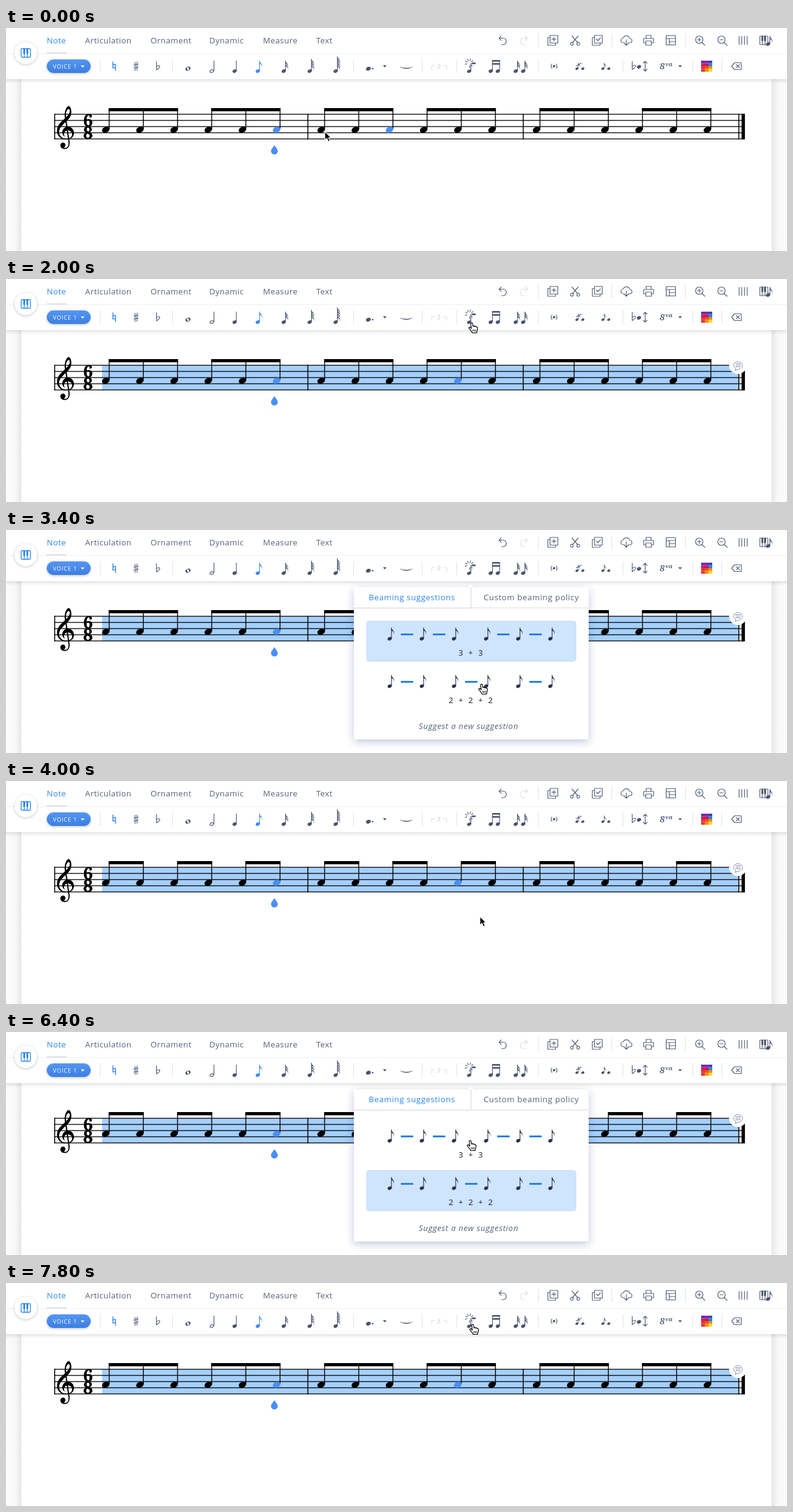
Write an HTML page that moves like this. It is 1264 px wide and 362 px high and loops after 8000 ms.

```html
<!DOCTYPE html>
<html lang="en">
<head>
<meta charset="utf-8">
<title>Beaming suggestions</title>
<style>
html, body { margin: 0; width: 100%; height: 100%; overflow: hidden; background: #fff; }
svg { display: block; width: 1264px; height: 362px; }
text { font-family: "Open Sans", sans-serif; font-size: 13px; fill: #56607a; }
.tab { letter-spacing: .45px; }
.head { letter-spacing: .6px; }
.mono { font: 13.33px "Noto Sans Mono", monospace; fill: #2c3348; white-space: pre; }
.line { fill: none; stroke: #56607a; stroke-width: 1.2; stroke-linecap: round; stroke-linejoin: round; }
.ink { fill: #4b556e; }
.blue { fill: #3d8bf2; }
</style>
</head>
<body>
<svg id="stage" viewBox="0 0 1264 362">
  <defs>
    <filter id="soft" x="-20%" y="-20%" width="140%" height="150%">
      <feDropShadow dx="0" dy="4" stdDeviation="7" flood-color="#2c4a80" flood-opacity=".3"/>
    </filter>
    <filter id="lift" x="-30%" y="-30%" width="160%" height="170%">
      <feDropShadow dx="0" dy="1" stdDeviation="2" flood-color="#000" flood-opacity=".25"/>
    </filter>
    <linearGradient id="button" x2="0" y2="1">
      <stop stop-color="#5596f2"/><stop offset="1" stop-color="#3c7fe2"/>
    </linearGradient>
    <linearGradient id="edgeL"><stop stop-color="#fcfcfc"/><stop offset=".6" stop-color="#f8f8f8"/><stop offset="1" stop-color="#e6e6e6"/></linearGradient>
    <linearGradient id="edgeR"><stop stop-color="#e6e6e6"/><stop offset=".4" stop-color="#f8f8f8"/><stop offset="1" stop-color="#fcfcfc"/></linearGradient>
    <linearGradient id="under" x2="0" y2="1"><stop stop-opacity=".1"/><stop offset="1" stop-opacity="0"/></linearGradient>
  </defs>
</svg>
<script>
const LOOP = 8000, STEP = 200;
const SELECT_AT = 200, HOVER_AT = 1000;
const popupSpans = [[2200, 3600], [5400, 6600]];
const pairSpan = [3600, 6600];
// time, x, y of the pointer tip
const path = [
  [0, 516, 168], [600, 516, 168], [800, 610, 168], [1000, 731, 160], [1200, 752, 64],
  [2000, 753.5, 71], [2400, 753.5, 71], [2800, 757, 130], [3200, 768, 240], [3400, 769.5, 250],
  [3600, 769.5, 250], [4000, 767, 220], [4600, 752, 80], [4800, 749, 63.5], [5600, 749, 63.5],
  [6200, 750.5, 165], [6400, 751, 176], [6600, 751, 176], [7200, 757, 233], [7600, 756, 95],
  [7800, 755, 67], [8000, 755, 67]
];

const stage = document.getElementById('stage');
const times = (n, make) => Array.from({ length: n }, (_, i) => make(i)).join('');
const rect = (x, y, w, h, fill, more = '') =>
  `<rect x="${x}" y="${y}" width="${w}" height="${h}" fill="${fill}" ${more}/>`;
const text = (x, y, str, more = 'class="tab"') => `<text x="${x}" y="${y}" ${more}>${str}</text>`;
const line = (d, more = '') => `<path class="line" d="${d}" ${more}/>`;
const fill = (d, cls = 'ink', more = '') => `<path class="${cls}" d="${d}" ${more}/>`;
const at = (x, y, body, scale = 1) => `<g transform="translate(${x} ${y}) scale(${scale})">${body}</g>`;
const group = (id, body, more = '') => `<g id="${id}" ${more}>${body}</g>`;
const oval = (x, y, rx, ry, more) =>
  `<ellipse rx="${rx}" ry="${ry}" transform="translate(${x} ${y}) rotate(-24)" ${more}/>`;

// Small note: origin at the head, flags hang from the stem top
function note(flags, height = 17, color = '#4b556e') {
  const flag = i => `M2.9 ${i * 4 - height}c.4 4 5.6 5 3.8 11.5c.3-4-1.2-5.8-3.8-6.6z`;
  return oval(0, 0, 3.5, 2.6, `fill="${color}"`) + rect(2.3, -height, 1.1, height - .5, color) +
    `<path fill="${color}" d="${times(flags, flag)}"/>`;
}

function pageArea() {
  return rect(0, 83, 25, 279, 'url(#edgeL)') + rect(1239, 83, 25, 279, 'url(#edgeR)');
}

const noteX = (bar, i) => 161.5 + bar * 348.6 + i * 55.3;

function beams(size) {
  return times(3, bar => times(6 / size, g => {
    const x = noteX(bar, g * size) + 4.8;
    return rect(x, 130, (size - 1) * 55.3 + 1.4, 5.2, '#000');
  }));
}

function score() {
  const clef = 'M95.8 176.8C90 174.5 89.2 166 95 161.8C103 157.5 110 163 110 170.5C110 177.5 104 181 97 181' +
    'C88 181 82.5 174.5 82.5 167C82.5 158 89 152.5 94.5 147.5C98.5 143.5 103 140 103.2 135' +
    'C103.3 132 102 131 101 131.5C98 133 96.8 138 97 142L102.8 184C104 192 100 196.5 95 196.5' +
    'C90.5 196.5 88 193.5 88 190.5C88 187.5 90 186 92.2 186C94.8 186 96.2 188 96.2 190' +
    'C96.2 192 94.8 193.5 93.5 194C98 196 102 193 101 185L95.2 145C94 137 97 127.5 101.5 126.5' +
    'C104 127 106 132 105.8 137C105.5 146 98 151 93 156C88.5 160.5 86 164 86 169' +
    'C86 175 91 179.7 97.5 179.7C103 179.7 107 177 107 172.5C107 168.5 103.5 166.3 100 166.3C94.5 166.3 92 173 95.8 176.8Z';
  const digit = (y, n) => `<text x="132.6" y="${y}" text-anchor="middle" style="font:800 27.5px 'Noto Serif',serif;fill:#000;stroke:#000;stroke-width:.5">${n}</text>`;
  return group('selection', rect(155.5, 140, 1031, 40, '#a5cffd')) +
    times(5, i => rect(78, 139.4 + i * 10, 1117, 1.3, '#000')) +
    [78, 487.8, 836.4, 1185.3].map(x => rect(x, 139.4, 1.5, 41.3, '#000')).join('') +
    rect(1190.5, 139.4, 5.4, 41.3, '#000') + fill(clef, '', 'fill="#000"') + digit(159.7, 6) + digit(179.7, 8) +
    times(3, bar => times(6, i => {
      const x = noteX(bar, i), blue = bar === 0 && i === 5;
      return rect(x + 4.8, 130, 1.4, 34, '#000') +
        oval(x, 165.2, 6.4, 4.6, `id="n${bar}${i}" fill="${blue ? '#4a8ff7' : '#000'}"`);
    })) +
    group('threes', beams(3)) + group('pairs', beams(2)) +
    fill('M434.4 190C436.5 194 439.9 196.6 439.9 200A5.5 5.2 0 0 1 428.9 200C428.9 196.6 432.3 194 434.4 190Z', '', 'fill="#4a8ff7"');
}

function commentBubble() {
  return group('comment', '<circle cx="1184.5" cy="140" r="14.2" fill="#fff"/>' +
    line('M1181 145.6a7.2 6.2 0 1 1 4 .9l-4.6 1.8zM1181 137.5h7.5M1181 140h7.5M1181 142.5h7.5',
      'style="stroke:#8a93a6;stroke-width:1"'));
}

function topIcons() {
  const undo = 'M-6-3.5h7a4.5 5 0 0 1 0 10.5h-3M-6-3.5l3.6-3.6M-6-3.5l3.6 3.6';
  const copy = 'M-4.5-8H8V4.500H-4.500ZM-4.500-4.500H-8V8H4.500V4.500';
  const lens = 'M5-1A6 6 0 1 1-7-1A6 6 0 0 1 5-1ZM3.300 3.500L8 8M-4-1H2';
  const icons = [
    [804, undo], [885, copy + 'M-1.500-1.800h6.500M1.800-5v6.500'],
    [921, 'M-5-7L4 3.500M5-7L-4 3.500M-3 5.500a2.300 2.300 0 1 1-4.600 0a2.300 2.300 0 0 1 4.600 0M7.500 5.500a2.300 2.300 0 1 1-4.600 0a2.300 2.300 0 0 1 4.600 0'],
    [957, copy + 'M-1.500-2l2.500 2.500L5-4'],
    [1004, 'M-3 4h-1.500a4 4 0 0 1-.5-8a5.500 5.500 0 0 1 10.500 1a3.500 3.500 0 0 1 0 7H3M0-1V8M-3 5l3 3l3-3'],
    [1040, 'M-4-3V-8H4V-3M-4.500 4H-8V-3H8V4H4.500M-4.500 1H4.500V8H-4.500Z'],
    [1076, 'M-7.500-7.500h15v15h-15zM-7.500-3h15M-2.500-3V7.500M-2.500 2H7.500'],
    [1123, lens + 'M-1-4V2'], [1159, lens], [1193, 'M-6.500-6.500v13M-2.200-6.500v13M2.200-6.500v13M6.500-6.500v13']
  ];
  const piano = rect(-10, -7, 13, 14, 'none', 'class="line" rx="1"') +
    line('M-6-7V7M-1.500-7V7') + rect(-7.4, -7, 3, 8, '#4b556e') + rect(-3, -7, 3, 8, '#4b556e');
  return icons.map(([x, d]) => at(x, 20, line(d))).join('') +
    `<g transform="translate(838 20) scale(-1 1)" opacity=".2">${line(undo)}</g>` +
    at(1230, 20, piano + at(3.5, 6, note(1, 13))) +
    [861, 980, 1099].map(x => rect(x, 9, 1, 22, '#dfe2e8')).join('');
}

function noteIcons() {
  const flat = 'M-2.500-8V5.500C0 4 2.800 2 2.800 0C2.800-2.200-.500-2-2.500 .500';
  const caret = 'M-3-1.500H3L0 2Z';
  const rays = times(8, i => {
    const a = (i * 40 - 195) * Math.PI / 180, c = Math.cos(a), s = Math.sin(a);
    return `M${(4 * c).toFixed(1)} ${(4 * s).toFixed(1)}L${(7 * c).toFixed(1)} ${(7 * s).toFixed(1)}`;
  });
  const small = at(-5, 4, note(1, 13), .75);
  const colors = ['#5e35b1', '#8e24aa', '#3949ab', '#d81b60', '#c2185b', '#1e88e5', '#e53935', '#f4511e', '#fb8c00', '#e53935', '#fb8c00', '#fdd835'];
  return [152, 269, 562, 673, 729, 861, 998, 1111, 1158].map(x => rect(x, 51, 1, 22, '#dfe2e8')).join('') +
    at(175, 62, line('M-2-7V3L2.300 2M2.300 7V-3L-2-2', 'style="stroke:#3d8bf2;stroke-width:1.500"')) +
    at(210.5, 62, line('M-1.500-6.500V7M1.500-7V6.500M-3.500-1.800L3.500-3.300M-3.500 3L3.500 1.500')) + at(246, 62.5, line(flat)) +
    oval(294.5, 66, 4.3, 3, 'class="ink"') + oval(294.5, 66, 1.5, 2.5, 'fill="#fff"') +
    oval(333, 70, 3.1, 2.1, 'class="line"') + rect(336, 53, 1.1, 17, '#4b556e') +
    at(370, 70, note(0)) + at(407.5, 70, note(1, 17, '#3d8bf2')) + at(449.5, 70, note(2)) +
    at(491.5, 70, note(3, 20)) + at(533.5, 70, note(4, 24)) +
    oval(586.5, 66, 4, 3, 'class="ink"') + '<circle cx="593.500" cy="66" r="1.300" class="ink"/>' +
    at(613, 62, fill(caret)) + fill('M637 62.500Q648 70 659 62.500Q648 67 637 62.500Z') +
    `<g opacity=".2">${line('M689 67V61H694M708 61H713V67')}${text(697, 66, '3', 'style="font:italic 700 11px \'Noto Serif\',serif"')}</g>` +
    at(750, 57, line(rays)) + oval(749.5, 70.2, 3.5, 2.5, 'class="ink"') + rect(751.8, 57, 1.2, 13, '#4b556e') + rect(754, 56, 6, 2.6, '#4b556e') +
    at(784.5, 70, note(0)) + at(796, 70, note(0)) + rect(786.8, 52, 12.6, 2.6, '#4b556e') + rect(786.8, 57, 12.6, 2.6, '#4b556e') +
    at(825, 70, note(2)) + at(837, 70, note(2)) +
    line('M883.500 58.500Q881 62 883.500 65.500M890.500 58.500Q893 62 890.500 65.500') + oval(887, 62, 2.2, 1.7, 'class="ink"') +
    at(929, 62, small + line('M-6-.500L2-5', 'stroke-width="1"') + oval(4.5, 4, 2.6, 2, 'class="ink"')) +
    at(971, 62, small + oval(4.5, 4, 2.6, 2, 'class="ink"')) +
    at(1016, 62, line(flat)) + oval(1024.5, 63, 3.5, 2.7, 'class="ink"') +
    line('M1034.500 54V70M1031.500 57L1034.500 54L1037.500 57M1031.500 67L1034.500 70L1037.500 67') +
    text(1058, 67, '8', 'style="font:italic 700 14px \'Noto Serif\',serif"') +
    text(1067, 62, 'va', 'style="font:italic 700 9.500px \'Noto Serif\',serif"') + at(1091, 62, fill(caret)) +
    colors.map((c, i) => rect(1125 + i % 3 * 6, 53 + Math.floor(i / 3) * 4.5, 6, 4.5, c)).join('') +
    line('M1174.500 62L1179 56.500H1190V67.500H1179ZM1182 59.500L1187 64.500M1187 59.500L1182 64.500');
}

function toolbar() {
  const tabs = [[66, 'Note'], [128, 'Articulation'], [234, 'Ornament'], [329, 'Dynamic'], [416, 'Measure'], [502, 'Text']];
  return rect(0, 83, 1264, 7, 'url(#under)') + rect(0, 0, 1264, 83, '#fff') + rect(0, 41, 1264, 1, '#f0f1f3') +
    rect(66, 39.5, 32, 2, '#dcdee3') +
    tabs.map(([x, name], i) => text(x, 25, name, `class="tab" ${i ? '' : 'style="fill:#2b86ea"'}`)).join('') +
    '<circle cx="32" cy="40.500" r="18" fill="#fff" filter="url(#lift)"/>' +
    at(32, 40.5, rect(-7.5, -7, 15, 14, 'none', 'rx="1.500" stroke="#2b86ea" stroke-width="1.300"') +
      line('M-2.500-7V7M2.500-7V7', 'style="stroke:#2b86ea"') + rect(-3.9, -7, 2.8, 8.5, '#2b86ea') + rect(1.1, -7, 2.8, 8.5, '#2b86ea')) +
    rect(66, 51, 71, 22, 'url(#button)', 'rx="11" filter="url(#lift)"') +
    text(76, 65.5, 'VOICE 1', 'style="font-size:9px;letter-spacing:.9px;fill:#fff"') +
    fill('M121 60.800H127L124 64.300Z', '', 'fill="#fff"') + topIcons() + noteIcons();
}

function popup() {
  const ink = '#2c3348';
  const row = (y, dashes) => times(6, i => at(621 + i * 52, y + 7.5, note(1, 18, ink))) +
    dashes.map(i => rect(639 + i * 52, y - 1, 20, 3, '#2583e8')).join('');
  return group('popup', `<path fill="#fff" filter="url(#soft)" d="M567 93H748L752.500 88.500L757 93H939a4 4 0 0 1 4 4V336a4 4 0 0 1-4 4H567a4 4 0 0 1-4-4V97a4 4 0 0 1 4-4Z"/>` +
    rect(563, 126, 380, 1, '#d9dce4') + rect(563, 127, 189, 3, 'url(#under)', 'opacity=".5"') + rect(752, 93, 1, 33, '#d3d7e0') +
    text(587, 114, 'Beaming suggestions', 'class="head" style="fill:#2b86ea"') +
    text(773, 114, 'Custom beaming policy', 'class="head"') +
    rect(583, 147, 340, 67, '#cfe4fd', 'rx="5" id="choice"') +
    row(169, [0, 1, 3, 4]) + row(246, [0, 2, 4]) +
    text(752, 204, '3 + 3', 'class="mono" text-anchor="middle"') +
    text(752, 281, '2 + 2 + 2', 'class="mono" text-anchor="middle"') +
    text(668, 323, 'Suggest a new suggestion', 'style="font-style:italic;letter-spacing:.72px"'));
}

function pointers() {
  const arrow = 'M0 0V14L3.300 11L5.700 16.500L8.300 15.300L6 10H10.200Z';
  const hand = 'M-1.300 1.500C-1.300-.400 1.500-.400 1.700 1.500L2.300 6C3 4.700 4.700 5 5 6.300C5.800 5.300 7.300 5.700 7.500 7' +
    'C8.500 6.400 9.700 7 9.700 8.500C9.800 12 8.300 13 8.200 16.500H1C.300 13.500-2 12-4 9.300C-5.200 7.300-3 6.300-1.500 8.200L-.400 9.300Z';
  return group('pointer', `<path id="arrow" d="${arrow}" fill="#000" stroke="#fff" stroke-width="1.100"/>` +
    group('hand', `<path d="${hand}" fill="#fff" stroke="#000" stroke-width="1.200" stroke-linejoin="round"/>` +
      '<path d="M2.200 11V14.500M4.300 11V14.500M6.400 11V14.500" stroke="#000" stroke-width=".9"/>'));
}

stage.insertAdjacentHTML('beforeend', pageArea() + score() + commentBubble() + toolbar() + popup() + pointers());

const el = id => document.getElementById(id);
const show = (id, on) => el(id).setAttribute('visibility', on ? 'visible' : 'hidden');
const within = (t, [from, to]) => t >= from && t < to;

function pointerAt(t) {
  const i = path.findIndex(p => p[0] > t);
  const [t0, x0, y0] = path[i - 1], [t1, x1, y1] = path[i];
  const k = (t - t0) / (t1 - t0);
  return [x0 + (x1 - x0) * k, y0 + (y1 - y0) * k];
}

function draw(t) {
  const open = popupSpans.some(span => within(t, span));
  const pairs = within(t, pairSpan);
  const [x, y] = pointerAt(t);
  const hand = open || y < 83;
  show('selection', t >= SELECT_AT);
  show('comment', t >= SELECT_AT);
  show('popup', open);
  show('pairs', pairs);
  show('threes', !pairs);
  show('hand', hand);
  show('arrow', !hand);
  el('choice').setAttribute('y', pairs ? 224 : 147);
  el('n12').setAttribute('fill', t < HOVER_AT ? '#4a8ff7' : '#000');
  el('n14').setAttribute('fill', t < HOVER_AT ? '#000' : '#4a8ff7');
  el('pointer').setAttribute('transform', `translate(${x} ${y})`);
}

function tick() {
  draw(Math.floor(performance.now() % LOOP / STEP) * STEP);
  requestAnimationFrame(tick);
}
tick();
</script>
</body>
</html>
```
